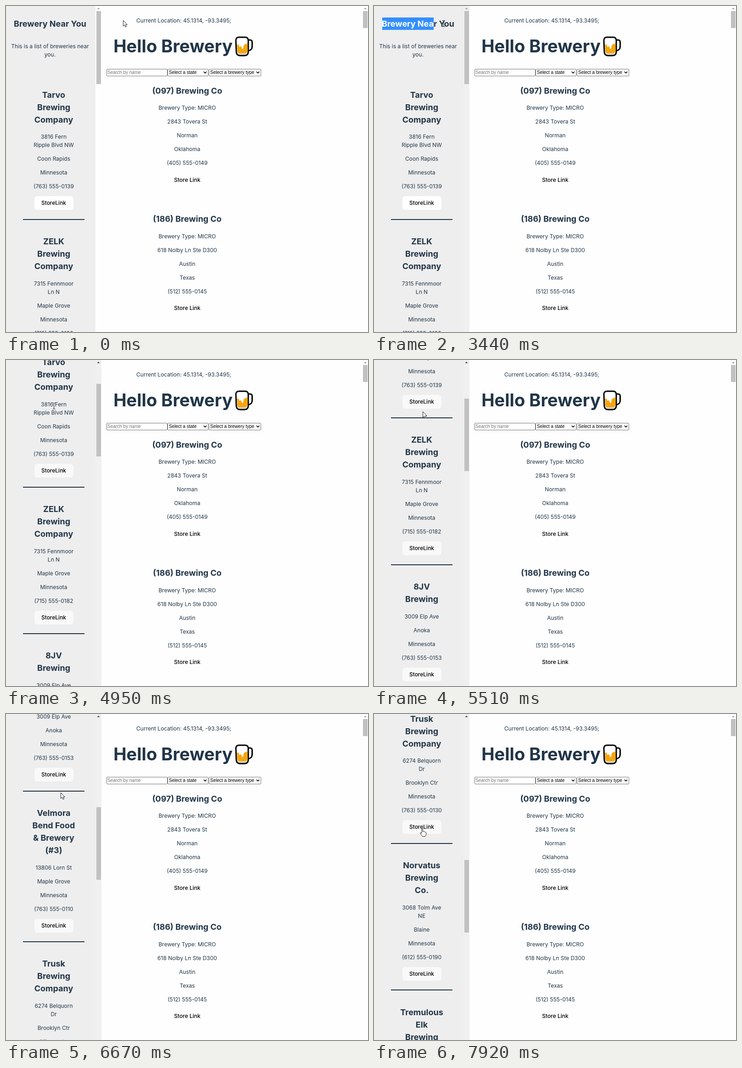
Animation of 789x710 px, one loop 8000 ms. Source, as an HTML page:

```html
<!DOCTYPE html>
<html lang="en">
<head>
<meta charset="utf-8">
<title>Brewery Near You</title>
<style>
html, body { margin: 0; width: 100%; height: 100%; overflow: hidden; background: #fefefe; }
#stage { position: relative; width: 789px; height: 710px; overflow: hidden;
  font: 400 12px/18px Inter, sans-serif; color: #213547; }
#stage div, svg { position: absolute; box-sizing: border-box; }
#side { left: 0; top: 0; width: 195px; height: 710px; overflow: hidden; background: #eee; }
#edge { left: 0; top: 0; width: 1px; height: 710px; background: #e2e2e2; }
#track { left: 195px; top: 0; width: 13px; height: 710px; background: #f0f0f0; }
.thumb { top: 11px; background: #c1c1c1; }
.line { width: 300px; height: 18px; text-align: center; white-space: nowrap; }
.h2 { height: 27px; font: 700 18px/27px Inter, sans-serif; }
.h1 { height: 42px; font: 700 38.1px/42px Inter, sans-serif; }
.link { font-weight: 500; color: #000; }
.button { width: 85px; height: 30px; line-height: 30px; border-radius: 6px; background: var(--button); }
.rule { width: 134px; height: 2px; background: #213547; }
.sel { overflow: hidden; background: #338fff; }
.sel .line { color: #fff; }
.field { top: 137px; height: 16px; border: 1px solid #767676; border-radius: 2px; padding-left: 2px;
  font: 10px/14px Arial, "Liberation Sans", sans-serif; color: #000; white-space: nowrap; background: #fff; }
.hint { color: #757575; padding-left: 1px; }
svg { left: 0; top: 0; pointer-events: none; }
</style>
</head>
<body>
<div id="stage">
  <div id="side"><div id="list"></div><div id="edge"></div></div>
  <div id="track"></div>
  <div class="thumb" id="thumb" style="left:196.5px;width:10px;height:158.5px"></div>
  <div class="thumb" style="left:778px;width:10px;height:37px"></div>
  <div class="field hint" style="left:219px;width:133px">Search by name</div>
  <div class="field" style="left:352px;width:89px">Select a state</div>
  <div class="field" style="left:442px;width:114px">Select a brewery type</div>
  <svg width="789" height="710" fill="none">
    <path id="up" d="M198.500 7L201.500 3.500L204.500 7Z"/>
    <path d="M780 7L783 3.500L786 7Z" fill="#a3a3a3"/>
    <path d="M431 143l3 3l3-3M546 143l3 3l3-3" stroke="#000" stroke-width="1.600"/>
    <g stroke="#000" stroke-width="3" stroke-linejoin="round" fill="#fff">
      <path d="M526 74H532Q536.500 74 536.500 79V89Q536 97 526 98"/>
      <path d="M501 75Q501 68 508 68H521Q528 68 528 75V101Q527 108 520 108H510Q503 108 502 101Z"/>
    </g>
    <path d="M504 101H526Q525 106 520 106H510Q505 106 504 101Z" fill="#d6d6d6"/>
    <path d="M503.500 84Q507 83 508 87Q509.500 91 511 88Q513 86 513.500 91Q515.500 97 517.500 91V87Q520 82 526.500 82V98Q525 103 520 103H510Q504.500 103 504 98Z" fill="#f6a60b"/>
  </svg>
  <svg id="pointer" width="789" height="710" stroke="#222" fill="#fff">
    <path d="M.5 .5V13L3.500 10.300L5.500 15L7.500 14L5.600 9.700H9.300Z"/>
    <path d="M-3 -6.500H-1L0 -5.500L1 -6.500H3M0 -5.500V6M-3 7H-1L0 6L1 7H3" fill="none"/>
    <path d="M-1 9V1Q0 -.5 1.300 1V7Q3 5.800 4 7.500Q6 6.500 6.500 8.200Q8.500 7.800 8.500 10V13Q8 16 6.500 17.500H.5Q-1 15 -4 11.500Q-5 9.500 -3 9.500L-1 11Z"/>
  </svg>
</div>
<script>
const $ = id => document.getElementById(id);
const stage = $('stage'), list = $('list');
const clamp = (v, lo, hi) => Math.min(hi, Math.max(lo, v));

function box(parent, cls, left, top) {
  const el = document.createElement('div');
  el.className = cls;
  el.style.left = left + 'px';
  el.style.top = top + 'px';
  parent.append(el);
  return el;
}

// A line of text centred on (x, y)
function line(parent, x, y, text, cls = '') {
  const h = cls === 'h1' ? 42 : cls === 'h2' ? 27 : cls === 'link button' ? 30 : 18;
  const width = cls === 'link button' ? 85 : 300;
  const span = document.createElement('span');
  span.textContent = text;
  box(parent, 'line ' + cls, x - width / 2, y - h / 2).append(span);
}

function selection(left, top, height, x, y, text, cls) {
  const el = box(stage, 'sel', left, top);
  el.style.height = height + 'px';
  line(el, x - left, y - top, text, cls);
  return el;
}

// Sidebar: name | address | city | phone, with / between wrapped lines
const nearby = [
  'Tarvo/Brewing/Company|3816 Fern/Ripple Blvd NW|Coon Rapids|(763) 555-0139',
  'ZELK/Brewing/Company|7315 Fennmoor/Ln N|Maple Grove|(715) 555-0182',
  '8JV/Brewing|3009 Elp Ave|Anoka|(763) 555-0153',
  'Velmora/Bend Food/& Brewery/(#3)|13806 Lorn St|Maple Grove|(763) 555-0110',
  'Trusk/Brewing/Company|6274 Belquorn/Dr|Brooklyn Ctr|(763) 555-0130',
  'Norvatus/Brewing/Co.|3068 Tolm Ave/NE|Blaine|(612) 555-0190',
  'Tremulous/Elk/Brewing|5140 Pell St|Anoka|(612) 555-0164'
];
const title = 'Brewery Near You';
line(list, 96, 38, title, 'h2');
line(list, 96, 88, 'This is a list of breweries near');
line(list, 96, 106, 'you.');
let y = 193;
for (const entry of nearby) {
  const [name, address, city, phone] = entry.split('|');
  for (const part of name.split('/')) { line(list, 104, y, part, 'h2'); y += 27; }
  y += 11.2;
  for (const part of address.split('/')) { line(list, 104, y, part); y += 18; }
  y += 12;
  for (const part of [city, 'Minnesota', phone]) { line(list, 104, y, part); y += 30; }
  y += 6;
  line(list, 104, y, 'StoreLink', 'link button');
  y += 35.2;
  box(list, 'rule', 37, y - .6);
  y += 48.1;
}

const place = 'Current Location: 45.1314, -93.3495;';
line(stage, 387.5, 32, place);
line(stage, 364, 87.2, 'Hello Brewery', 'h1');
const results = [
  '(097) Brewing Co|2843 Tovera St|Norman|Oklahoma|(405) 555-0149',
  '(186) Brewing Co|618 Nolby Ln Ste D300|Austin|Texas|(512) 555-0145'
];
results.forEach((entry, i) => {
  const [name, ...rows] = entry.split('|'), top = 184 + 279.5 * i;
  line(stage, 395, top, name, 'h2');
  ['Brewery Type: MICRO', ...rows].forEach((row, k) => line(stage, 395, top + 38.4 + 30 * k, row));
  line(stage, 395, top + 194.6, 'Store Link', 'link');
});

const placeSel = selection(283, 23, 18, 387.5, 32, place);
const titleSel = selection(18, 24.5, 27, 96, 38, title, 'h2');
stage.append($('pointer'));

// The screen refreshes about every 140 ms, evenly between these moments
const beats = [0, 1510, 3440, 4950, 5510, 6670, 7920, 8000];
function lastRefresh(time) {
  const i = beats.findLastIndex(b => b <= time);
  const start = beats[i], gap = beats[i + 1] - start;
  const step = gap / Math.max(1, Math.round(gap / 140));
  return start + Math.floor((time - start) / step) * step;
}

// Pointer way points: time, x, y
const path = [
  [0, 255, 31], [700, 264, 30], [1370, 505, 31], [1510, 512, 29], [2240, 257, 32], [2820, 16, 38],
  [3440, 152, 38], [3590, 164, 38], [4260, 104.5, 100], [4950, 104.5, 100], [5510, 106, 112],
  [6670, 119, 171], [7700, 105, 249], [8000, 105, 249]
];
function pointerAt(t) {
  const i = Math.max(1, path.findIndex(p => p[0] >= t));
  const [t0, x0, y0] = path[i - 1], [t1, x1, y1] = path[i];
  const f = (t - t0) / (t1 - t0);
  return [x0 + (x1 - x0) * f, y0 + (y1 - y0) * f];
}

// Wheel flicks: start, end, notches of 75 px
const flicks = [[4260, 4650, 2], [4795, 5210, 2], [5320, 7360, 14], [7500, 7920, 1]];
const scrollAt = t => flicks.reduce((sum, [start, end, notches]) =>
  sum + 75 * notches * clamp((t - start) / (end - start), 0, 1) ** 1.392, 0);

// The highlight trails the dragging pointer a little
const dragged = (t, left, width) => clamp(pointerAt(t - 102)[0] - left, 0, width);

function shapeAt(x, y) {
  const hit = document.elementFromPoint(x, y);
  if (hit?.closest('.button')) return 2;
  return hit?.tagName === 'SPAN' ? 1 : 0;
}

function draw() {
  const t = lastRefresh(performance.now() % 8000);
  const scroll = scrollAt(t), [x, y] = pointerAt(t);
  list.style.top = -scroll + 'px';
  $('thumb').style.top = 11 + scroll * .2154 + 'px';
  $('up').setAttribute('fill', scroll ? '#505050' : '#a3a3a3');
  stage.style.setProperty('--button', scroll ? '#f9f9f9' : '#fff');
  $('track').hidden = t < 680;
  $('edge').hidden = t >= 680;
  placeSel.style.width = (t > 680 && t < 2820 ? dragged(Math.min(t, 1510), 283, 209) : 0) + 'px';
  titleSel.style.width = (t > 2900 && t < 3800 ? dragged(t, 18, 157) : 0) + 'px';

  const shape = shapeAt(x, y);
  [...$('pointer').children].forEach((el, i) => {
    el.setAttribute('transform', `translate(${x} ${y})`);
    el.style.display = i === shape ? '' : 'none';
  });
  requestAnimationFrame(draw);
}
draw();
</script>
</body>
</html>
```
